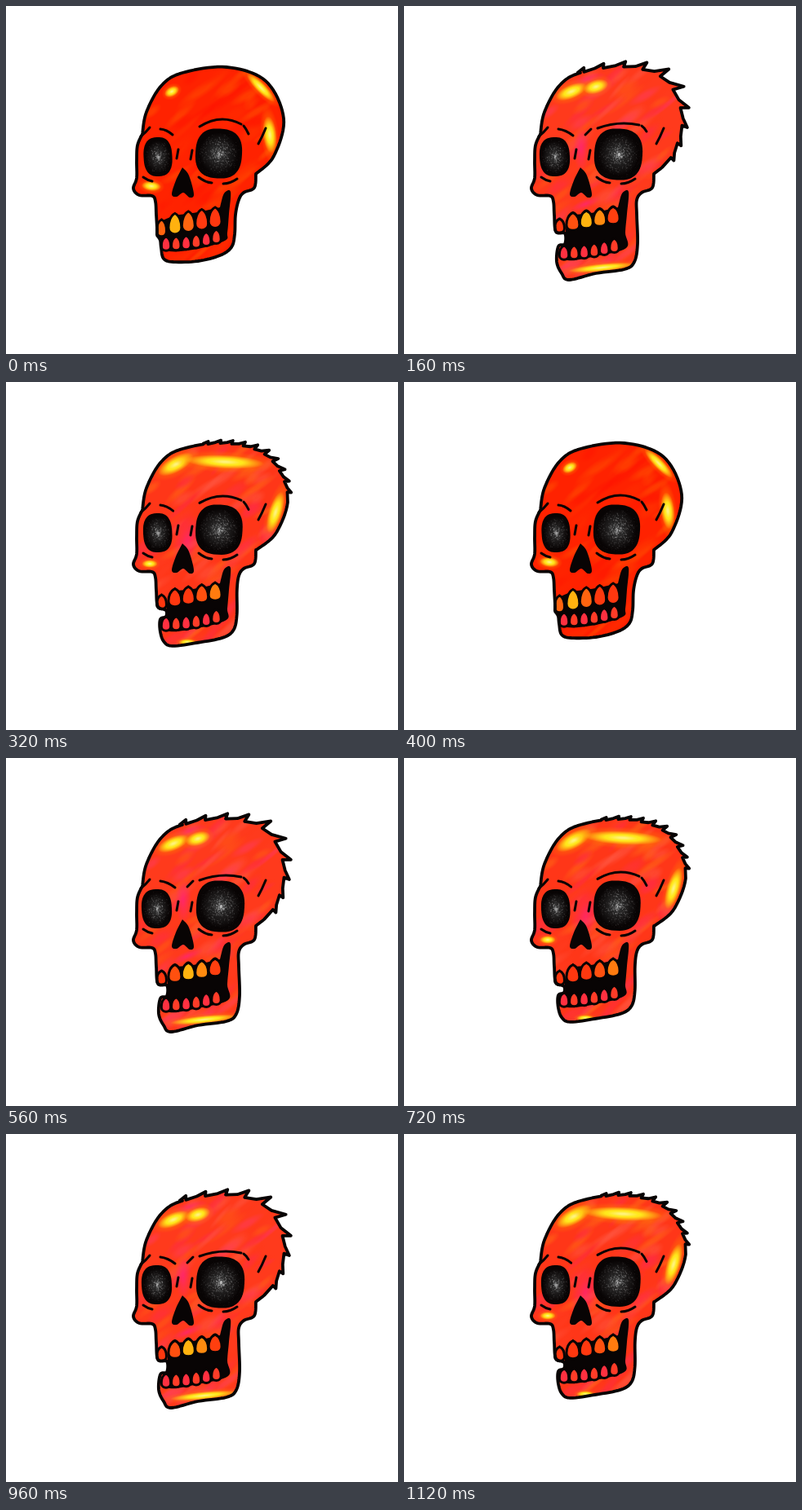
An HTML page with a canvas that plays this animation: 480 by 427 pixels, repeating every 1.2 s.

```html
<!DOCTYPE html>
<html lang="en">
<head>
<meta charset="utf-8">
<title>Burning skull</title>
<style>
html, body { margin: 0; width: 100%; height: 100%; overflow: hidden; background: #fff; }
canvas { display: block; }
</style>
</head>
<body>
<canvas id="stage" width="480" height="427"></canvas>
<script>
const ctx = document.getElementById('stage').getContext('2d');
const STEP = 80, INK = '#080404';

// Colour moods; glows are x, y, rx, ry, angle
const calm = {
  base: '#ff2200', streaks: ['#ff1400', '#ff3000', '#ff5200', '#ff2400'], hot: 1, heat: .9,
  glows: [[203, 105, 8, 5, -.5], [312, 100, 20, 5, .8], [323, 158, 7, 19, -.1], [178, 221, 10, 5, .1]]
};
const blaze = {
  base: '#ff3a1c', streaks: ['#ff5540', '#ff2a48', '#ff5a14', '#ff3818', '#ff3a60'], hot: 2.3, heat: 1,
  glows: [[205, 105, 17, 7, -.4], [235, 99, 13, 7, -.3], [242, 321, 34, 4, -.1]],
  flush: [[224, 91, 20, 6, -.3], [217, 175, 8, 24, 0], [222, 243, 18, 5, -.4]]
};
const ember = {
  base: '#ff3618', streaks: ['#ff5540', '#ff2a48', '#ff6a14', '#ff3c20'], hot: 4, heat: .5,
  glows: [[208, 101, 20, 8, -.5], [268, 98, 40, 7, .05], [330, 160, 7, 22, .3], [176, 223, 8, 4, 0], [222, 319, 9, 3, 0]],
  flush: [[222, 195, 14, 28, .3], [322, 188, 12, 14, 0]]
};

// drop: jaw opening, anger: brow, fire: flame height on [from, to] of the dome
const poses = [
  { ...calm, drop: 0, anger: 0, fire: 0, from: 3, to: 3, spikes: 0, swell: 0 },
  { ...blaze, drop: .65, anger: .6, fire: 10, from: 3.3, to: 7.4, spikes: 10, swell: 0 },
  { ...blaze, drop: 1, anger: 1, fire: 16, from: 3.1, to: 7.5, spikes: 10, swell: 0 },
  { ...blaze, drop: 1.3, anger: 1, fire: 29, from: 3.1, to: 7.5, spikes: 10, swell: 0 },
  { ...ember, drop: .45, anger: .2, fire: 8, from: 3.6, to: 6.2, spikes: 10, swell: 5 }
];

const domeKeys = [[167, 157], [172, 130], [190, 98], [216, 82], [270, 75], [318, 92], [340, 138], [328, 184], [306, 206]];
const nose = [[216, 198], [208, 214], [203, 231], [209, 234], [217, 229], [225, 235], [230, 231], [224, 208]];

function random(seed) {
  return () => (seed = seed * 16807 % 2147483647) / 2147483647;
}

// Catmull-Rom position on an open chain
function along(p, u) {
  const i = Math.min(Math.floor(u), p.length - 2), t = u - i;
  const at = k => p[Math.max(0, Math.min(p.length - 1, k))];
  const [a, b, c, d] = [at(i - 1), at(i), at(i + 1), at(i + 2)];
  return [0, 1].map(n => b[n] + t * (c[n] - a[n] + t * (2 * a[n] - 5 * b[n] + 4 * c[n] - d[n]
    + t * (3 * (b[n] - c[n]) + d[n] - a[n]))) / 2);
}

function smooth(p) {
  const out = [];
  for (let u = 0; u <= p.length - 1; u += .125) out.push(along(p, u));
  return out;
}

function trace(p) {
  ctx.beginPath();
  p.forEach(q => ctx.lineTo(...q));
  ctx.closePath();
}

function dome(s) {
  const keys = domeKeys.map(([x, y]) => [x + s.swell * Math.max(0, (x - 300) / 40), y]);
  const end = keys.length - 1, out = [];
  const arc = (a, b) => { for (let u = a; u < b; u += .1) out.push(along(keys, u)); };
  // Point pushed outwards by h and forwards by lean
  const lift = (u, h, lean) => {
    const [x, y] = along(keys, u), [a, b] = along(keys, u + .02);
    const len = Math.hypot(a - x, b - y), tx = (a - x) / len, ty = (b - y) / len;
    return [x + ty * h + tx * lean, y - tx * h + ty * lean];
  };
  arc(0, s.from);
  const gap = (s.to - s.from) / s.spikes;
  for (let k = 0; k < s.spikes; k++) {
    const u = s.from + k * gap;
    const h = s.fire * (.3 + .7 * Math.exp(-(((u - 5.1) / .85) ** 2)));
    out.push(lift(u - gap * .4, h * .25, 0), lift(u, h, h * .25), lift(u, h * .2 - 1, 0));
  }
  arc(s.to, end);
  out.push(keys[end]);
  return out;
}

function skull(s) {
  const d = s.drop, gap = Math.min(1, d * 2);
  return dome(s).concat(smooth([
    [306, 206], [304, 223], [291, 229], [285, 238], [281 + 4 * d, 256], [280 + 6 * d, 280 + 12 * d],
    [276 + 6 * d, 296 + 18 * d], [262 + 8 * d, 306 + 17 * d], [235, 313 + 15 * d], [205 - 3 * d, 314 + 22 * d],
    [193, 310 + 18 * d], [190 - 3 * d, 297 + 17 * d], [189, 288 + 7 * d], [187 + 10 * gap, 284 + 8 * d],
    [185 + 12 * gap, 281 - 2 * d], [185 + gap, 274 + 3 * d], [184, 256], [183, 240], [179, 233],
    [163, 232], [156, 224], [160, 211], [160, 190], [161, 171], [167, 157]
  ]));
}

function mouth(d) {
  const gap = Math.min(1, d * 2);
  return smooth([
    [262, 247], [267, 230], [275, 228], [273, 255], [271, 278], [268 + 4 * d, 288 + 9 * d],
    [235, 298 + 9 * d], [200, 301 + 11 * d], [190 + 8 * gap, 290 + 9 * d], [188 + 10 * gap, 268 + 6 * gap],
    [204, 258], [222, 255], [240, 252], [262, 247]
  ]);
}

// Rounded box, flatter sided than an ellipse
function socket(cx, cy, rx, ry, turn) {
  const bend = v => Math.sign(v) * Math.abs(v) ** .78;
  return Array.from({ length: 60 }, (_, i) => {
    const a = i / 60 * Math.PI * 2, x = rx * bend(Math.cos(a)), y = ry * bend(Math.sin(a));
    return [cx + x * Math.cos(turn) - y * Math.sin(turn), cy + x * Math.sin(turn) + y * Math.cos(turn)];
  });
}

function blob([x, y, rx, ry, turn], color, core = .3) {
  const g = ctx.createRadialGradient(0, 0, 0, 0, 0, 1);
  g.addColorStop(0, color);
  g.addColorStop(core, color);
  g.addColorStop(1, color + '00');
  ctx.save();
  ctx.translate(x, y);
  ctx.rotate(turn);
  ctx.scale(rx * 1.2, ry * 1.2);
  ctx.fillStyle = g;
  ctx.fillRect(-1, -1, 2, 2);
  ctx.restore();
}

function paint(s) {
  const rnd = random(77);
  ctx.globalAlpha = .5;
  for (let i = 0; i < 130; i++) {
    const spot = [160 + rnd() * 180, 80 + rnd() * 255, 10 + rnd() * 22, 3 + rnd() * 5, -.45 - rnd() * .4];
    blob(spot, s.streaks[i % s.streaks.length]);
  }
  ctx.globalAlpha = .75;
  (s.flush || []).forEach(f => blob(f, '#ff2478', 0));
  ctx.globalAlpha = 1;
  for (const [x, y, rx, ry, turn] of s.glows) {
    blob([x, y, rx * 1.35, ry * 1.6, turn], '#ff7a00', .1);
    blob([x, y, rx, ry, turn], '#ffe81c', .45);
    blob([x, y, rx * .4, ry * .4, turn], '#fff27a', .2);
  }
}

function tooth(x, bottom, w, h, color) {
  const r = w / 2, top = bottom - h;
  ctx.beginPath();
  ctx.moveTo(x, top);
  ctx.bezierCurveTo(x + r * .7, top + h * .1, x + r, top + h * .4, x + r, top + h * .65);
  ctx.bezierCurveTo(x + r, bottom + 1, x - r, bottom + 1, x - r, top + h * .65);
  ctx.bezierCurveTo(x - r, top + h * .4, x - r * .7, top + h * .1, x, top);
  ctx.fillStyle = color;
  ctx.fill();
  ctx.stroke();
}

function teeth(s) {
  const gap = Math.min(1, s.drop * 2);
  ctx.lineWidth = 3;
  for (let i = 0; i < 6; i++) {
    tooth(196 + 12.3 * i, 301 + 11 * s.drop - i * i * .35, 11.5, 18, i % 2 ? '#ff3c28' : '#ff3040');
  }
  for (let i = 0; i < 5; i++) {
    const hue = 10 + 34 * s.heat * Math.exp(-((i - s.hot) ** 2));
    tooth(190.5 + 16.4 * i, 284 - 2.5 * i - 5 * gap, i ? 16 : 12, (i ? 27 : 22) - 4 * gap, `hsl(${hue},100%,53%)`);
  }
}

function eye(cx, cy, rx, ry, turn) {
  const rnd = random(Math.round(cx));
  ctx.save();
  trace(socket(cx, cy, rx, ry, turn));
  ctx.fillStyle = INK;
  ctx.fill();
  ctx.clip();
  blob([cx, cy, rx * .7, ry * .7, 0], '#343434', 0);
  for (let i = 0; i < rx * ry * .8; i++) {
    const a = rnd() * Math.PI * 2, d = rnd();
    ctx.fillStyle = `rgba(205,205,205,${(1 - d) * rnd() * .7})`;
    ctx.fillRect(cx + Math.cos(a) * d * rx, cy + Math.sin(a) * d * ry, 1, 1);
  }
  ctx.restore();
}

function marks(a) {
  // x, y, bow, x, y
  const lines = [
    [176, 149, 1, 165, 160], [189, 151, -2, 204 + 3 * a, 158 + a],
    [237, 148 + 2 * a, -10 + 5 * a, 288, 145 + a], [291, 147, -1, 297, 157 - 3 * a],
    [318, 150, 1, 309, 169], [211, 176, 0, 209, 187], [228, 177, 0, 226, 188],
    [236, 210, 2, 252, 217], [266, 218, 2, 283, 212], [168, 210, 1, 179, 215]
  ];
  if (a > .5) lines.push([222, 158, 0, 229, 151]);
  ctx.lineWidth = 3;
  for (const [x, y, bow, u, v] of lines) {
    ctx.beginPath();
    ctx.moveTo(x, y);
    ctx.quadraticCurveTo((x + u) / 2, (y + v) / 2 + bow * 1.5, u, v);
    ctx.stroke();
  }
}

function draw(s) {
  ctx.fillStyle = '#fff';
  ctx.fillRect(0, 0, 480, 427);
  ctx.lineJoin = ctx.lineCap = 'round';
  ctx.strokeStyle = INK;

  const edge = skull(s);
  ctx.save();
  trace(edge);
  ctx.fillStyle = s.base;
  ctx.fill();
  ctx.clip();
  paint(s);
  ctx.restore();

  trace(mouth(s.drop));
  ctx.fillStyle = INK;
  ctx.fill();
  teeth(s);

  trace(edge);
  ctx.lineWidth = 3.8;
  ctx.stroke();

  eye(186 - 1.5 * s.anger, 185, 17.5 + s.anger, 24, -.05);
  eye(260.5 + 2 * s.anger, 181 + s.anger, 28.5 + s.anger, 30.5 + s.anger, .06);
  trace(smooth([...nose, nose[0]]));
  ctx.fillStyle = INK;
  ctx.fill();
  marks(s.anger);
}

let shown = -1;
function tick(now) {
  const i = Math.floor((now + .5) / STEP) % poses.length;
  if (i !== shown) draw(poses[shown = i]);
  requestAnimationFrame(tick);
}
draw(poses[0]);
requestAnimationFrame(tick);
</script>
</body>
</html>
```
